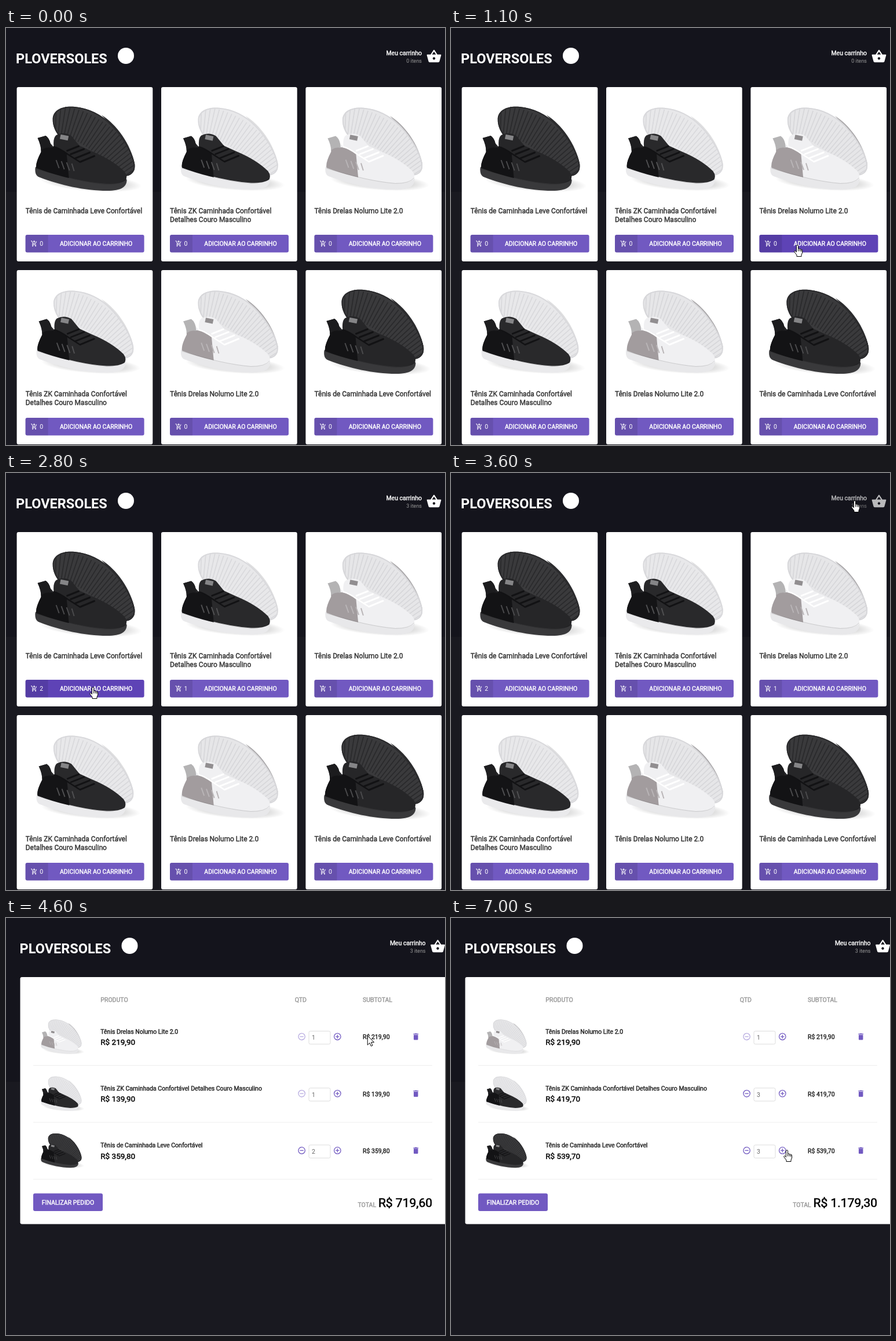
An HTML page for the animation above (7.2 s loop, 758x720 px).

```html
<!DOCTYPE html>
<html lang="pt-BR">
<head>
<meta charset="utf-8">
<title>Loja de tênis</title>
<style>
  html, body { margin: 0; width: 100%; height: 100%; overflow: hidden; background: #191920; }
  svg { display: block; width: 100%; height: 100%; }
  text { font: 10.5px Roboto, sans-serif; fill: currentColor; }
  .strong { stroke: currentColor; stroke-width: .42px; }
  .title { font-size: 12px; color: #333; }
  .brand { font-size: 23.5px; font-weight: 700; color: #fff; }
  .small { font-size: 9px; color: #999; }
  .white { color: #fff; }
  .grey { color: #999; }
  .dark { color: #222; }
  .price { font-size: 13.5px; color: #000; }
  .total { font-size: 21px; color: #000; stroke-width: .6px; }
  .end { text-anchor: end; }
  .mid { text-anchor: middle; }
  .button { fill: #7159c1; }
  .button.hover { fill: #5e43b6; }
  .round { fill: none; stroke: #7159c1; stroke-width: 1.3; }
  .allBlack { --sole: #39393b; --upper: #262628; --rear: #131315; --tab: #1c1c1e; --back: #3a3a3c;
    --tread: #2a2a2c; --rim: #2c2c2e; --lace: #121214; --bar: #4a4a4c; --tag: #858587; }
  .blackWhite { --sole: #eaeaec; --upper: #29292b; --rear: #141416; --tab: #1e1e20; --back: #e8e8ea;
    --tread: #d9d9dc; --rim: #dededf; --lace: #121214; --bar: #505052; --tag: #858587; }
  .greyWhite { --sole: #e8e8ea; --upper: #f0f0f2; --rear: #a29c9e; --tab: #b4b3b4; --back: #e6e6e8;
    --tread: #d7d7da; --rim: #a9a7a9; --lace: #fff; --bar: #b9b5b7; --tag: #918e90; }
</style>
</head>
<body>
<svg viewBox="0 0 758 720">
  <defs>
    <radialGradient id="shade">
      <stop offset="0" stop-color="#000" stop-opacity=".3"/>
      <stop offset=".6" stop-color="#000" stop-opacity=".16"/>
      <stop offset="1" stop-color="#000" stop-opacity="0"/>
    </radialGradient>
    <path id="backSole" d="M80 158C80 142 96 134 118 136C142 138 164 149 182 167C200 185 220 216 222 238C222 250 214 256 203 256L120 215C95 195 80 178 80 158Z"/>
    <clipPath id="treadClip"><use href="#backSole"/></clipPath>
    <g id="shoe">
      <ellipse cx="146" cy="267" rx="88" ry="15" fill="url(#shade)" transform="rotate(4 146 267)"/>
      <path d="M164 150C190 166 215 200 222 236L212 226C202 198 184 170 164 150Z" fill="var(--rim)"/>
      <use href="#backSole" fill="var(--back)"/>
      <g clip-path="url(#treadClip)" fill="none" stroke="var(--tread)">
        <path d="M78 160C125 158 178 190 218 255" stroke-width="52" stroke-dasharray="1.8 4.7"/>
        <use href="#backSole" stroke-width="4"/>
      </g>
      <path d="M50 241C49 250 51 256 58 258C92 271 135 281 174 281C199 281 208 274 208 262L198 252L60 228Z" fill="var(--sole)"/>
      <path d="M54 190L68 186Q74 190 76 199L82 206Q80 190 86 185Q99 178 112 186L126 203L148 213Q184 228 204 248Q210 256 206 263Q198 269 174 269Q125 266 52 242Q49 235 60 214Q60 203 54 190Z" fill="var(--upper)"/>
      <path d="M60 209Q72 203 88 208L104 216L108 259Q78 252 52 242Q50 233 60 214Z" fill="var(--rear)"/>
      <path d="M54 190L68 186Q74 190 76 199L77 207Q68 205 60 211Q60 202 54 190Z" fill="var(--tab)"/>
      <path d="M81 205Q91 207 106 218L128 232" fill="none" stroke="var(--lace)" stroke-width="2.5"/>
      <path d="M105 212L125 204M111 218L134 209M119 225L144 215M128 231L152 221" fill="none" stroke="var(--lace)" stroke-width="3" stroke-linecap="round"/>
      <path d="M86 228L91 242M95 230L100 244M104 232L109 246M113 234L117 247" stroke="var(--bar)" stroke-width="2"/>
      <rect x="93" y="185" width="14" height="8" fill="var(--tag)" transform="rotate(12 100 189)"/>
      <path d="M52 243Q125 266 174 270Q199 270 207 260" fill="none" stroke="#0002"/>
    </g>
    <path id="cartIcon" d="M11 9h2V6h3V4h-3V1h-2v3H8v2h3v3zm-4 9c-1.1 0-1.99.9-1.99 2S5.9 22 7 22s2-.9 2-2-.9-2-2-2zm10 0c-1.1 0-1.99.9-1.99 2s.89 2 1.99 2 2-.9 2-2-.9-2-2-2zm-9.83-3.25l.03-.12.9-1.63h7.45c.75 0 1.41-.41 1.75-1.03l3.86-7.01L19.42 4h-.01l-1.1 2-2.76 5H8.53l-.13-.27L6.16 6l-.95-2-.94-2H1v2h2l3.6 7.59-1.35 2.45c-.16.28-.25.61-.25.96 0 1.1.9 2 2 2h12v-2H7.42c-.13 0-.25-.11-.25-.25z"/>
    <path id="basketIcon" d="M17.21 9l-4.38-6.56c-.19-.28-.51-.42-.83-.42-.32 0-.64.14-.83.43L6.79 9H2c-.55 0-1 .45-1 1 0 .09.01.18.04.27l2.54 9.27c.23.84 1 1.46 1.92 1.46h13c.92 0 1.69-.62 1.93-1.46l2.54-9.27L23 10c0-.55-.45-1-1-1h-4.79zM9 9l3-4.4L15 9H9zm3 8c-1.1 0-2-.9-2-2s.9-2 2-2 2 .9 2 2-.9 2-2 2z"/>
    <path id="trashIcon" d="M6 19c0 1.1.9 2 2 2h8c1.1 0 2-.9 2-2V7H6v12zM19 4h-3.5l-1-1h-5l-1 1H5v2h14V4z"/>
  </defs>

  <rect width="758" height="720" fill="#191920"/>
  <rect width="758" height="283" fill="#14141c"/>

  <g id="header">
    <text class="brand" x="17" y="61">PLOVERSOLES</text>
    <circle cx="207" cy="48" r="14" fill="#fff"/>
    <g id="basket">
      <text class="strong white end" x="718" y="46.8">Meu carrinho</text>
      <text class="small end" id="items" x="718" y="59.5"></text>
      <use href="#basketIcon" fill="#fff" transform="translate(725.5 35.5) scale(1.125)"/>
    </g>
  </g>

  <g id="shop"></g>

  <g id="cart">
    <rect x="24.5" y="102" width="740" height="426.5" rx="3" fill="#fff"/>
    <text class="strong grey" x="163.3" y="145">PRODUTO</text>
    <text class="strong grey" x="498.7" y="145">QTD</text>
    <text class="strong grey" x="616" y="145">SUBTOTAL</text>
    <g id="rows"></g>
    <rect class="button" x="47" y="475.5" width="120" height="30.5" rx="3"/>
    <text class="strong white mid" x="107" y="494.5">FINALIZAR PEDIDO</text>
    <text class="end" x="736" y="499"><tspan class="strong grey">TOTAL</tspan><tspan class="strong total" id="total" dx="3.8"></tspan></text>
  </g>

  <path id="status" d="M0 708H147Q151 708 151 712V720H0Z" fill="#dee1e6"/>

  <g id="cursor" fill="#fff" stroke="#000" stroke-linejoin="round">
    <path id="arrow" d="M0 0V16L3.7 12.5L6.1 18L8.7 16.9L6.3 11.4H11.3Z"/>
    <path id="hand" d="M-1.6 1.4Q-1.6-.2 0-.2T1.6 1.4V6.2Q3.4 5.2 4.3 6.8Q6 6 6.7 7.7Q8.6 7.2 8.6 9.3V13L7 17V19.5H-1V17L-5 11.8Q-5.6 10.4-4.6 9.8Q-3.6 9.4-1.6 11.8ZM1.6 6.5V10.5M4.3 7V10.5M6.7 8V11"/>
  </g>
</svg>

<script>
const LOOP = 7200, CART_OPENS = 3800, CART_SHIFT = 6.5;
const COLUMN = 249.4, CARD_PITCH = 316, ROW_PITCH = 98.3;
const $ = id => document.getElementById(id);

const products = [
  { look: 'allBlack', price: 179.9, lines: ['Tênis de Caminhada Leve Confortável'] },
  { look: 'blackWhite', price: 139.9, lines: ['Tênis ZK Caminhada Confortável', 'Detalhes Couro Masculino'] },
  { look: 'greyWhite', price: 219.9, lines: ['Tênis Drelas Nolumo Lite 2.0'] }
];
const shelf = [0, 1, 2, 1, 2, 0];
const cartOrder = [2, 1, 0];

// [time, product]
const clicks = [[1300, 2], [1900, 1], [2500, 0], [2800, 0], [5200, 1], [5800, 1], [6800, 0]];

// [time, x, y]
const path = [
  [500, 775, 520], [1000, 598, 375], [1500, 598, 375], [1900, 404, 365], [2100, 404, 365],
  [2400, 150, 370], [2900, 150, 370], [3500, 697, 48], [4200, 697, 48], [4900, 577, 304],
  [5900, 577, 304], [6300, 580, 401]
];

const shoe = (look, transform) => `<use href="#shoe" class="${look}" transform="${transform}"/>`;

function card(product, i) {
  const { look, lines } = products[product];
  const size = look === 'allBlack' ? 1 : .975;
  return `<g transform="translate(${.6 + i % 3 * COLUMN} ${Math.floor(i / 3) * CARD_PITCH})">
    <rect x="18" y="102" width="234.7" height="301" rx="3" fill="#fff"/>
    ${shoe(look, `translate(136 208.5) scale(${size}) translate(-136 -208.5)`)}
    ${lines.map((line, n) => `<text class="strong title" x="33.1" y="${319.5 + n * 15}">${line}</text>`).join('')}
    <rect class="button add" x="33" y="357" width="205" height="30.5" rx="3"/>
    <path d="M72 357H36Q33 357 33 360V384.5Q33 387.5 36 387.5H72Z" fill="#0000001a"/>
    <use href="#cartIcon" fill="#fff" transform="translate(42 366.3) scale(.5)"/>
    <text class="white count" x="57.6" y="376">0</text>
    <text class="strong white mid" x="155" y="376">ADICIONAR AO CARRINHO</text>
  </g>`;
}

function row(product, i) {
  const { look, lines } = products[product];
  return `<g transform="translate(0 ${i * ROW_PITCH})">
    ${shoe(look, 'translate(95.5 205) scale(.408) translate(-136 -208.5)')}
    <text class="strong dark" x="163.3" y="199.7">${lines.join(' ')}</text>
    <text class="strong price sum" x="163.3" y="219"></text>
    <g class="round minus"><circle cx="510.6" cy="204.8" r="5.7"/><path d="M507.5 204.8h6.2"/></g>
    <rect x="523" y="195.3" width="37" height="22.5" rx="2.5" fill="#fff" stroke="#ddd"/>
    <text class="qty" x="528" y="210.3" color="#666"></text>
    <g class="round"><circle cx="572.3" cy="204.8" r="5.7"/><path d="M569.2 204.8h6.2M572.3 201.7v6.2"/></g>
    <text class="strong dark sum" x="616" y="209.3"></text>
    <use href="#trashIcon" fill="#7159c1" transform="translate(700.2 197.3) scale(.625)"/>
    <path d="M47 254.5H736" stroke="#eee"/>
  </g>`;
}

$('shop').innerHTML = shelf.map(card).join('');
$('rows').innerHTML = cartOrder.map(row).join('');
const addButtons = [...document.querySelectorAll('.add')];
const counts = [...document.querySelectorAll('.count')];
const rows = [...$('rows').children];

const money = value => 'R$ ' + value.toFixed(2).replace('.', ',').replace(/\B(?=(\d{3})+,)/, '.');
const show = (el, on) => { el.style.display = on ? '' : 'none'; };
const within = ([px, py], x, y, w, h) => px >= x && px <= x + w && py >= y && py <= y + h;

function cursorAt(t) {
  const next = path.findIndex(key => key[0] > t);
  if (next < 0) return path.at(-1).slice(1);
  if (next === 0) return path[0].slice(1);
  const [t0, x0, y0] = path[next - 1], [t1, x1, y1] = path[next];
  const u = (t - t0) / (t1 - t0), ease = u * u * (3 - 2 * u);
  return [x0 + (x1 - x0) * ease, y0 + (y1 - y0) * ease];
}

function render(t) {
  const inCart = t >= CART_OPENS;
  const point = cursorAt(t);
  const quantity = products.map((_, p) => clicks.filter(c => c[1] === p && c[0] <= t).length);
  const shift = inCart ? CART_SHIFT : 0;

  show($('shop'), !inCart);
  show($('cart'), inCart);
  show($('status'), inCart && t < 4600);
  $('header').setAttribute('transform', `translate(${shift})`);
  $('items').textContent = quantity.filter(Boolean).length + ' itens';

  const onBasket = within(point, 656 + shift, 35, 97, 28);
  $('basket').style.opacity = onBasket ? .7 : 1;

  let onControl = onBasket;
  addButtons.forEach((button, i) => {
    const hover = !inCart && within(point, 33 + i % 3 * COLUMN, 357 + Math.floor(i / 3) * CARD_PITCH, 205, 30.5);
    button.classList.toggle('hover', hover);
    onControl ||= hover;
  });
  quantity.forEach((n, p) => { counts[p].textContent = n; });

  let total = 0;
  rows.forEach((el, i) => {
    const product = cartOrder[i], n = quantity[product], sum = n * products[product].price;
    total += sum;
    el.querySelectorAll('.sum').forEach(text => { text.textContent = money(sum); });
    el.querySelector('.qty').textContent = n;
    el.querySelector('.minus').style.opacity = n > 1 ? 1 : .5;
    onControl ||= inCart && within(point, 564, 196 + i * ROW_PITCH, 17, 17);
  });
  $('total').textContent = money(total);

  show($('cursor'), t > path[0][0]);
  show($('hand'), onControl);
  show($('arrow'), !onControl);
  $('cursor').setAttribute('transform', `translate(${point})`);
}

// The picture advances in steps of a tenth of a second.
let start, shown;
function tick(now) {
  start ??= now;
  const t = Math.floor((now - start) % LOOP / 100) * 100;
  if (t !== shown) render(shown = t);
  requestAnimationFrame(tick);
}
render(0);
requestAnimationFrame(tick);
</script>
</body>
</html>
```
